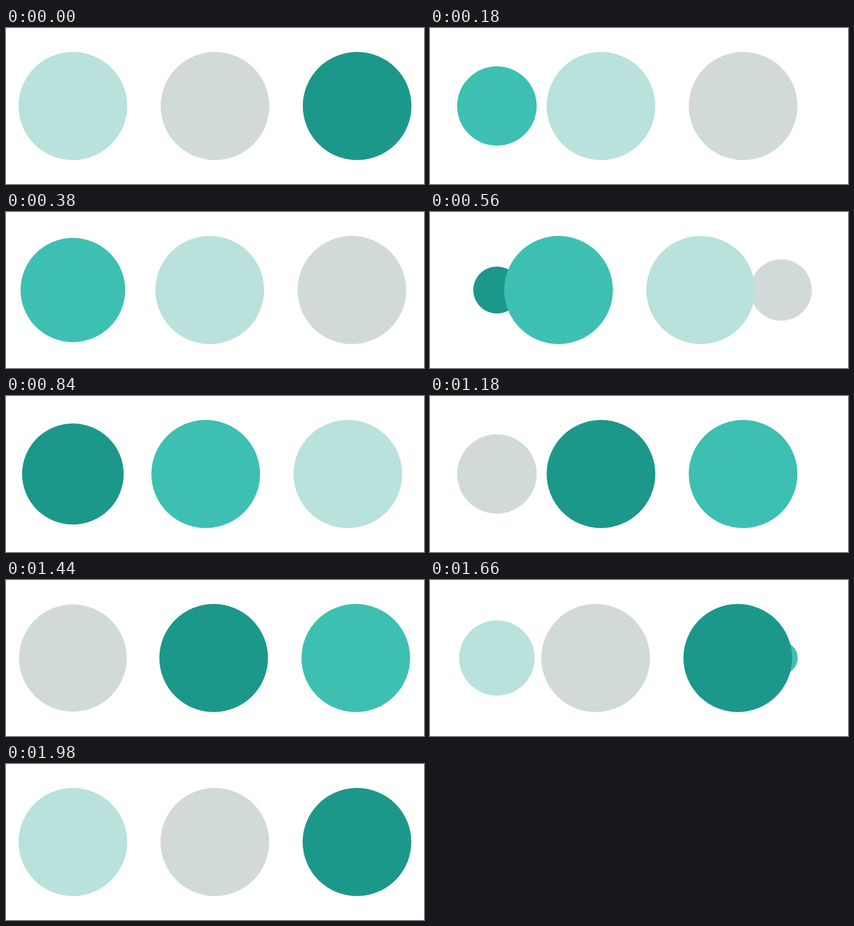
Recreate the animation shown at these times as an HTML page with a canvas. Size 800 by 300 pixels, loop 2 s.

```html
<!DOCTYPE html>
<html lang="en">
<head>
<meta charset="utf-8">
<title>Sliding dots loader</title>
<style>
  html, body { margin: 0; width: 100%; height: 100%; overflow: hidden; background: #fff; }
  canvas { display: block; }
</style>
</head>
<body>
<canvas id="stage" width="800" height="300"></canvas>
<script>
const ctx = document.getElementById('stage').getContext('2d');
const COLORS = ['#1c988a', '#3dc0b2', '#b8e2db', '#d1dad8'];
const STEP = 500, TICK = 20, LEFT = 128, GAP = 272, RADIUS = 104;

// cubic-bezier(0, .5, .5, 1), solved in closed form
function ease(p) {
  const t = 1 + 2 * Math.cos((2 * Math.PI - Math.acos(1 - p)) / 3);
  return 1.5 * t - 0.5 * t ** 3;
}

function dot(color, slot, scale) {
  ctx.fillStyle = color;
  ctx.beginPath();
  ctx.arc(LEFT + GAP * slot, 150, Math.max(0, RADIUS * scale), 0, 2 * Math.PI);
  ctx.fill();
}

function draw(now) {
  // Each picture is held for one tick.
  const time = Math.floor(now / TICK) * TICK % (4 * STEP);
  const step = Math.floor(time / STEP);
  const e = ease(time / STEP - step);
  ctx.clearRect(0, 0, 800, 300);

  // The leaving dot shrinks behind the others.
  dot(COLORS[(4 - step) % 4], 2, 1 - e);

  // Phases: 0 hidden, 1 growing, 2 and 3 sliding right.
  COLORS.forEach((color, i) => {
    const phase = (i + step) % 4;
    if (phase === 1) dot(color, 0, e);
    if (phase > 1) dot(color, phase - 2 + e, 1);
  });
}

function loop() {
  draw(performance.now());
  requestAnimationFrame(loop);
}
loop();
</script>
</body>
</html>
```
